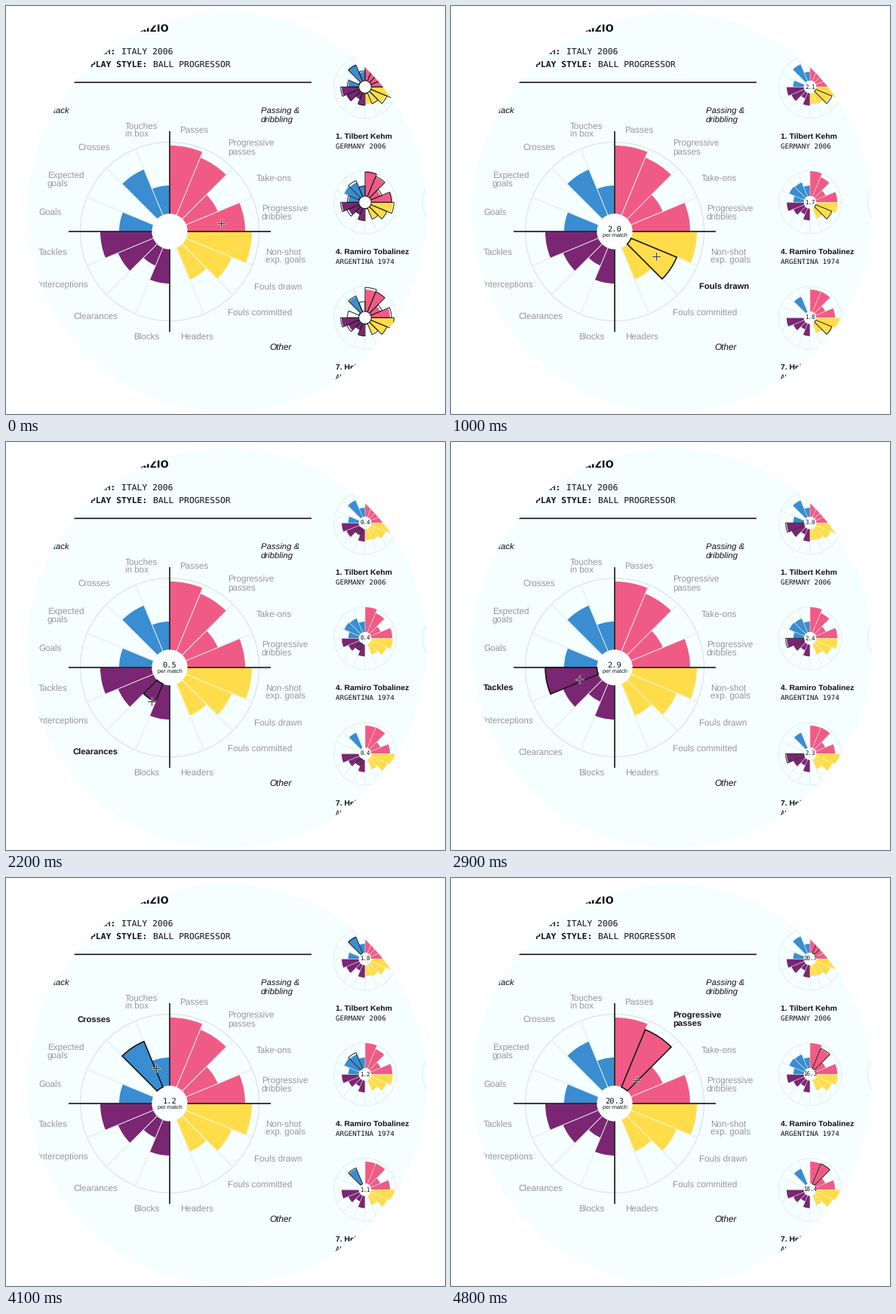
These frames come from a looping animation (582x541 px, 4900 ms). A matplotlib script:

```python
import numpy as np
import matplotlib.pyplot as plt
from matplotlib.animation import FuncAnimation
from matplotlib.patches import Annulus, Circle, Wedge

W, H, DPI = 582, 541, 64
PX = 72 / DPI  # points per pixel
FRAMES, STEP = 49, 100
SLICE = 360 / 16

MINT, INK, GREY = "#f6ffff", "#111111", "#969999"
RING, SPOKE = "#dde3e3", "#e5eaea"
QUADRANTS = ["#f05b86", "#ffdd4a", "#7a2673", "#398dd0"]  # clockwise from top

CENTER, OUTER, INNER = (217, 299), 118.5, 23.5
LENS, LENS_R = (292.7, 273), 265.2
MINI_X, MINI_Y, MINI_GAP, MINI_SCALE = 476, 107.3, 153, 0.351

# Clockwise from top: label, its left edge and middle, wedge radius, per match
METRICS = [
    ("Passes", 230, 164, 114, 71.6),
    ("Progressive\npasses", 294, 187, 106, 20.3),
    ("Take-ons", 332, 228, 69, 1.1),
    ("Progressive\ndribbles", 339, 274, 100, 6.4),
    ("Non-shot\nexp. goals", 344, 331, 109, 0.4),
    ("Fouls drawn", 329, 372, 89, 2.0),
    ("Fouls committed", 294, 406, 69, 1.5),
    ("Headers", 231, 438, 0, 0.0),
    ("Blocks", 169, 438, 69, 0.8),
    ("Clearances", 89, 411, 49, 0.5),
    ("Interceptions", 43, 370, 74, 1.6),
    ("Tackles", 43, 326, 92, 2.9),
    ("Goals", 43, 273, 67, 0.1),
    ("Expected\ngoals", 55, 230, 0, 0.0),
    ("Crosses", 95, 187, 89, 1.2),
    ("Touches\nin box", 158, 164, 61, 0.9),
]
NAMES = [m[0].replace("\n", " ") for m in METRICS]
PROFILE = np.array([m[3] for m in METRICS], float)
RATES = np.array([m[4] for m in METRICS])

# Similar players: the main profile with some variation, and what sets them apart
PLAYERS = [
    ("1. Tilbert Kehm", "GERMANY 2006", {"Headers": 65}),
    ("4. Ramiro Tobalinez", "ARGENTINA 1974", {"Expected goals": 85}),
    ("7. Heino Falber", "AUSTRIA 1978", {"Goals": 0, "Touches in box": 0}),
]

# Pointer stops: time, x, y; it circles the centre between them
STOPS = [(0, 285, 288), (1000, 272, 332), (1500, 230, 350), (2200, 193, 344),
         (3300, 169, 294), (4100, 199, 252), (4800, 246, 268)]
HOVER_LAG = 40

plt.rcParams["text.hinting"] = "none"
fig = plt.figure(figsize=(W / DPI, H / DPI), dpi=DPI, facecolor="white")
ax = fig.add_axes([0, 0, 1, 1])
ax.set(xlim=(0, W), ylim=(H, 0))
ax.axis("off")


def text(x, y, s, size, color=INK, font="Liberation Sans", **kw):
    return ax.text(x, y, s, fontsize=size * PX, color=color, family=font,
                   va="baseline", zorder=6, **kw)


def mono(x, y, s, size, **kw):
    return text(x, y, s, size, font="DejaVu Sans Mono", **kw)


def label(s, x, y, size, leading=10.5, **kw):
    """Left-aligned rows, vertically centred on y."""
    rows = s.split("\n")
    top = y + 4 - leading * (len(rows) - 1) / 2
    return [text(x, top + leading * k, row, size, **kw)
            for k, row in enumerate(rows)]


def line(xs, ys, color, width, z, **kw):
    return ax.plot(xs, ys, color=color, lw=width * PX, zorder=z, snap=False,
                   solid_capstyle="butt", **kw)[0]


def circle(center, r, z, face="none", edge="none", width=0):
    ax.add_patch(Circle(center, r, fc=face, ec=edge, lw=width * PX, zorder=z))


def wedge(center, i, r, inner, z, face="none", edge="none", width=0):
    start = SLICE * i - 90
    return ax.add_patch(Wedge(
        center, r, start, start + SLICE, width=r - inner, fc=face, ec=edge,
        lw=width * PX, joinstyle="miter", zorder=z))


def polar(angle, r, center=CENTER):
    a = np.radians(angle)
    return center[0] + r * np.cos(a), center[1] + r * np.sin(a)


def chart(center, radii, scale, spoke, gap, outline):
    """Draw a wedge chart; return hidden outlines of the main profile on it."""
    inner, outer = INNER * scale, OUTER * scale
    circle(center, outer, 1, edge=RING, width=spoke * 0.55)
    circle(center, inner, 4, face="#fcffff")
    for i, r in enumerate(radii * scale):
        ends = zip(*[polar(SLICE * i, d, center) for d in (inner, outer)])
        xs, ys = ends
        line(xs, ys, SPOKE, spoke, 1)
        line(xs, ys, MINT, gap, 2.5)
        if r > inner:
            wedge(center, i, r, inner, 2, face=QUADRANTS[i // 4])
    return [wedge(center, i, max(r, inner + 0.5), inner, 5, edge=INK,
                  width=outline) for i, r in enumerate(PROFILE * scale)]


# Page, seen through a round lens
circle(LENS, LENS_R, 0, face=MINT)
ax.add_patch(Annulus(LENS, LENS_R + 400, 400, fc="white", ec="none", zorder=9))

text(216, 34, "Nevo Talzio", 18, weight="bold", ha="right")
for y, key, value in [(64, "TEAM:", "ITALY 2006"),
                      (81, "PLAY STYLE:", "BALL PROGRESSOR")]:
    mono(112, y, key, 11.4, weight="bold")
    mono(112 + 6.9 * (len(key) + 1), y, value, 11.4)
line([60, 405], [101.3, 101.3], INK, 1.6, 3)

label("Attack", 53, 139, 11.4, style="italic")
label("Passing &\ndribbling", 338, 144.5, 11.4, leading=11.5, style="italic")
label("Other", 349, 452, 11.8, style="italic")

# Main chart
main_lines = chart(CENTER, PROFILE, 1, 2.2, 0.9, 1.6)
cx, cy = CENTER
line([cx, cx], [cy - 133, cy + 133], INK, 1.6, 3)
line([cx - 134, cx + 134], [cy, cy], INK, 1.6, 3)
per_match = text(cx, cy + 7, "per match", 7.4, ha="center")

plain = [label(*m[:3], size=11.6, color=GREY) for m in METRICS]
bold = [label(*m[:3], size=11.25, weight="bold") for m in METRICS]

# Each chart's outlines, centre text and the numbers shown in it
charts = [(main_lines, mono(cx, cy, "", 10.4, ha="center"), RATES)]

rng = np.random.default_rng(4)
for k, (name, team, traits) in enumerate(PLAYERS):
    y = MINI_Y + MINI_GAP * k
    radii = PROFILE * rng.uniform(0.88, 1.04, 16)
    for trait, r in traits.items():
        radii[NAMES.index(trait)] = r
    lines = chart((MINI_X, y), radii, MINI_SCALE, 1.2, 0.5, 0.9)
    value = mono(MINI_X, y + 2.7, "", 7.5, ha="center")
    charts.append((lines, value, RATES * rng.uniform(0.65, 1.05, 16)))
    text(437, y + 68.7, name, 10.4, weight="bold")
    mono(437, y + 81.3, team, 9.2)
circle((594, MINI_Y + MINI_GAP), OUTER * MINI_SCALE, 1, edge=RING, width=0.7)

# Crosshair pointer: dark lines with a pale rim
cross = [(line([], [], "white", 2.6, 7, alpha=0.6), 5.8),
         (line([], [], "#3c3c3c", 1.1, 7), 5.3)]

times, px, py = np.array(STOPS, float).T
dx, dy = px + 0.5 - cx, py + 0.5 - cy
turns = np.degrees(np.unwrap(np.arctan2(dy, dx)))
reach = np.hypot(dx, dy)


def update(n):
    t = n * STEP
    x, y = polar(np.interp(t, times, turns), np.interp(t, times, reach))
    for mark, arm in cross:
        mark.set_data([x - arm, x + arm, np.nan, x, x],
                      [y, y, np.nan, y - arm, y + arm])

    # Nothing is hovered until the pointer first moves
    hover = None
    if n:
        angle = np.interp(t - HOVER_LAG, times, turns)
        hover = int((angle + 90) % 360 // SLICE)

    for i in range(len(METRICS)):
        for row in plain[i]:
            row.set_visible(i != hover)
        for row in bold[i]:
            row.set_visible(i == hover)

    per_match.set_visible(hover is not None)
    for lines, value, rates in charts:
        for i, patch in enumerate(lines):
            compare = hover is None and lines is not main_lines
            patch.set_visible(compare or i == hover)
        value.set_text("" if hover is None else f"{rates[hover]:.1f}")
    return []


anim = FuncAnimation(fig, update, frames=FRAMES, init_func=lambda: update(0),
                     interval=STEP, repeat=True, repeat_delay=0, blit=False)
plt.show()
```
